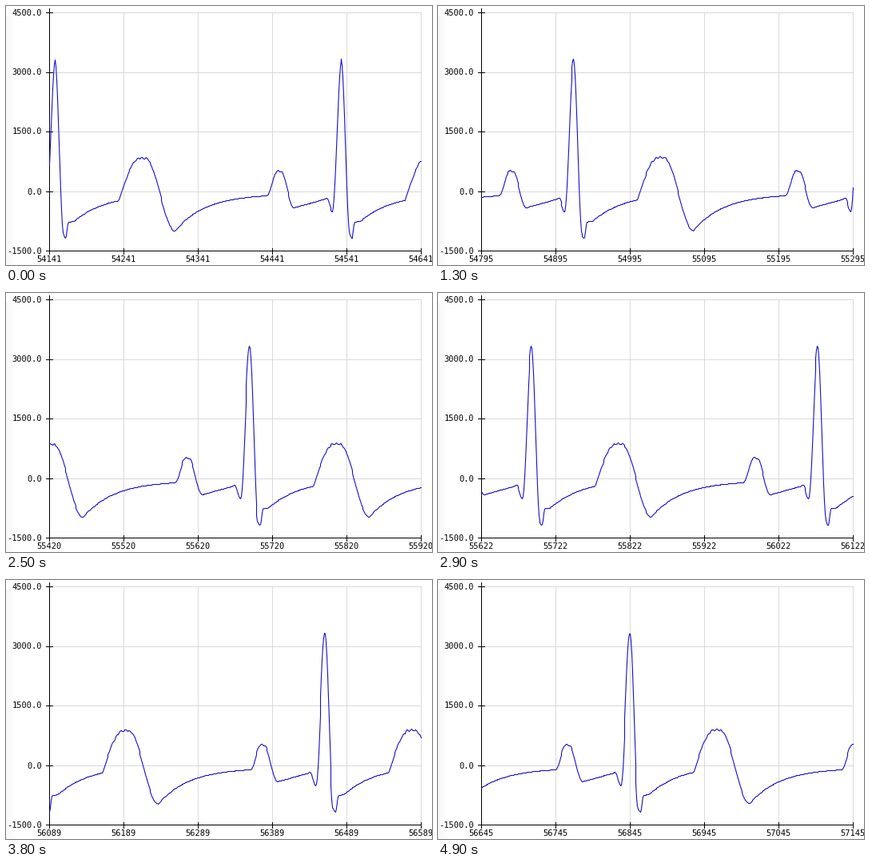
A matplotlib script that plays this animation: 533x324 px, repeating every 5 s.

```python
import numpy as np
import matplotlib.pyplot as plt
from matplotlib.animation import FuncAnimation

W, H, DPI = 533, 324, 100
FRAMES, INTERVAL = 50, 100
PX = 72 / DPI                      # points per pixel
LEFT, RIGHT, BOTTOM = 54, 519, 306
SCALE = 0.93                       # pixels per sample
WINDOW = 500                       # samples in view
FIRST_PEAK, PERIOD = 54148.5, 385.14
INK, TRACE, GRID = "black", "#160ecc", "#d9d9d9"

# Scroll position at a few frames; close to steady in between
KEY_FRAMES = [0, 7, 13, 25, 33, 38, 49]
KEY_STARTS = [54141, 54493, 54795, 55420, 55823, 56089, 56645]


def linear(t):
    return t


def smooth(t):
    return (1 - np.cos(np.pi * t)) / 2


def quick(t):
    return np.sin(np.pi * t / 2)


def settle(rate):
    return lambda t: (1 - np.exp(-rate * t)) / (1 - np.exp(-rate))


# Turning points of a heartbeat: pixels after the main peak, screen height,
# and the easing that leads there
BEAT = [
    (0, 66, linear),
    (10.5, 286, smooth), (13.5, 290.5, quick), (17, 270, smooth),
    (24, 269, linear), (80, 243, settle(1.4)),
    (106, 190, quick), (113, 190, linear), (150, 281, smooth),
    (265, 237, settle(3)),
    (278, 206, smooth), (282, 206, linear), (299, 252, smooth),
    (335, 242, linear), (340, 240, smooth), (347, 257, smooth),
    (PERIOD * SCALE, 66, smooth),
]


def bump(d, center, width):
    return np.exp(-((d - center) / width) ** 2)


def heart_signal(samples):
    beat, phase = np.divmod(samples - FIRST_PEAK, PERIOD)
    d = phase * SCALE
    y = np.zeros_like(d)
    for (x0, y0, _), (x1, y1, ease) in zip(BEAT, BEAT[1:]):
        inside = (d >= x0) & (d <= x1)
        y[inside] = y0 + (y1 - y0) * ease((d[inside] - x0) / (x1 - x0))
    ripple = np.sin(2 * np.pi * d / 5.5)
    y += ripple * (1.2 * bump(d, 104, 14) + 0.8 * bump(d, 280, 5))
    return y - 3 * beat / 7 * bump(d, 95, 70)    # later beats sit higher


def line(xs, ys, color, **style):
    return ax.plot(xs, ys, color=color, lw=PX, antialiased=False,
                   solid_capstyle="butt", **style)[0]


def label(x, y, text, align):
    return ax.text(x, y, text, ha=align, va="center_baseline", color=INK,
                   family="DejaVu Sans Mono", size=10.35 * PX)


fig = plt.figure(figsize=(W / DPI, H / DPI), dpi=DPI, facecolor="white")
ax = fig.add_axes([0, 0, 1, 1])
ax.axis("off")

# Faint shade along the left edge
shade = np.linspace(0.965, 1, 14)[None, :]
ax.imshow(shade, cmap="gray", vmin=0, vmax=1, extent=(0, 14, H, 12),
          aspect="auto", zorder=0)
ax.set_xlim(0, W)
ax.set_ylim(H, 0)

x_ticks = [LEFT + 93 * i for i in range(6)]
y_ticks = [(round(8.5 + 74.4 * i), 4500 - 1500 * i) for i in range(5)]
dotted = dict(linestyle=(0, (1, 1)), dash_capstyle="butt")

for x in x_ticks[1:]:
    line([x, x], [8, BOTTOM], GRID, **dotted)
for y, _ in y_ticks[:-1]:
    line([LEFT, RIGHT], [y, y], GRID, **dotted)

line([LEFT, LEFT], [3, BOTTOM + 4], INK)
line([LEFT - 4, RIGHT], [BOTTOM, BOTTOM], INK)
for x in x_ticks[1:]:
    line([x, x], [BOTTOM - 3, BOTTOM + 4], INK)
for y, value in y_ticks:
    line([LEFT - 4, LEFT + 4], [y, y], INK)
    label(45, y - 0.5, f"{value:.1f}", "right")

x_labels = [label(x, 316.5, "", "center") for x in x_ticks]
trace, = ax.plot([], [], color=TRACE, lw=1.1 * PX, snap=False)


def update(frame):
    start = round(float(np.interp(frame, KEY_FRAMES, KEY_STARTS)))
    offsets = np.arange(WINDOW + 1)
    xs = np.round(LEFT + offsets * SCALE)
    ys = np.round(heart_signal(start + offsets))
    trace.set_data(xs + 0.5, ys + 0.5)
    for i, text in enumerate(x_labels):
        text.set_text(str(start + 100 * i))
    return [trace, *x_labels]


anim = FuncAnimation(fig, update, frames=FRAMES, interval=INTERVAL,
                     repeat=True, repeat_delay=0)
plt.show()
```
